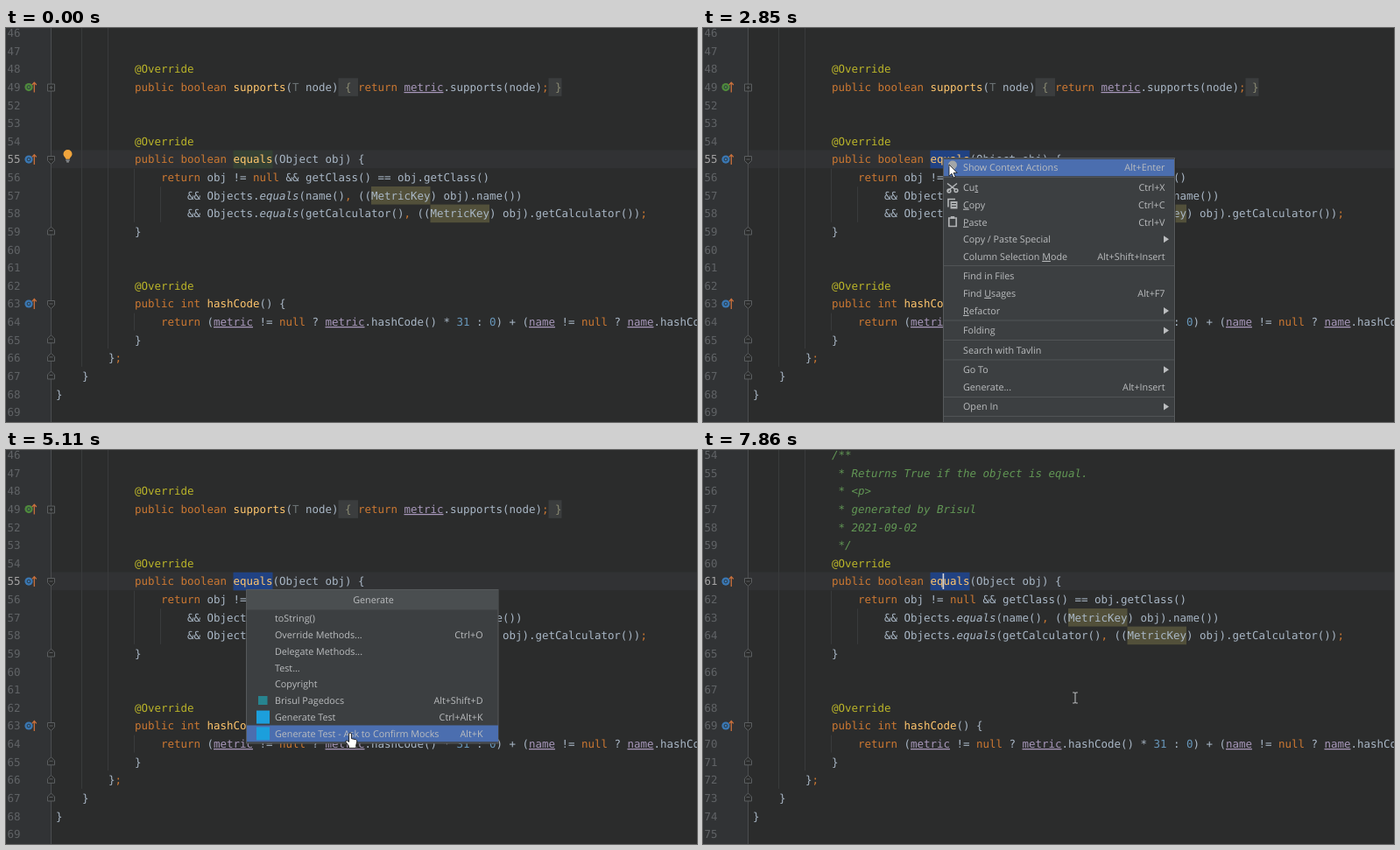
Write an HTML page that moves like this. It is 789 by 450 pixels and loops after 8000 ms.

```html
<!DOCTYPE html>
<html lang="en">
<head>
<meta charset="utf-8">
<title>Editor: generate a comment</title>
<style>
html, body { margin: 0; width: 100%; height: 100%; overflow: hidden; background: #2b2c2c; }
svg { display: block; width: 789px; height: 450px; }
text { white-space: pre; text-rendering: geometricPrecision; font-variant-ligatures: none; }
.code { font: 12.46px "DejaVu Sans Mono", monospace; fill: #a9b7c6; }
.ui { font: 10.75px "Open Sans", "Noto Sans", sans-serif; fill: #bbbdbf; }
.num { fill: #606366; }
.num.on { fill: #a4a3a3; }
.note { fill: #bbb529; }
.key { fill: #cc7832; }
.field { fill: #a898bb; text-decoration: underline; }
.lit { fill: #6897bb; }
.static { font-style: italic; }
.decl { fill: #ffc66d; }
.type { fill: #6c7376; }
.fold { fill: #8a8a72; }
.doc { fill: #629755; font-style: italic; }
.u { text-decoration: underline; }
</style>
</head>
<body>
<svg id="stage" viewBox="0 0 789 450"></svg>
<script>
const LOOP = 8000, CH = 7.5, LEFT = 57;
const rowY = r => 5.7 + 20.62 * r;
const colX = c => LEFT + c * CH;
const esc = s => s.replace(/&/g, '&amp;').replace(/</g, '&lt;');
const rect = (x, y, w, h, fill, more = '') =>
  `<rect x="${x}" y="${y}" width="${w}" height="${h}" fill="${fill}" ${more}/>`;
const line = (x1, y1, x2, y2, color) =>
  `<path d="M${x1} ${y1}L${x2} ${y2}" stroke="${color}"/>`;
const group = (id, body) => `<g id="${id}">${body}</g>`;
const at = (x, y, body) => `<g transform="translate(${x} ${y})">${body}</g>`;

// ---- code ----
const SYNTAX = /(?<note>@\w+)|(?<key>\b(?:public|boolean|int|return|null)\b|[;,])|(?<field>\b(?:metric|name)\b(?!\())|(?<lit>\b\d+\b)|(?<static>(?<=Objects\.)equals)|(?<decl>(?<=(?:boolean|int) )\w+)|(?<type>\bT\b)|(?<fold>\{(?= return)|(?<=; )\})/g;

function paint(src) {
  let out = '', end = 0;
  for (const m of src.matchAll(SYNTAX)) {
    const kind = Object.keys(m.groups).find(k => m.groups[k]);
    out += esc(src.slice(end, m.index)) + `<tspan class="${kind}">${m[0]}</tspan>`;
    end = m.index + m[0].length;
  }
  return out + esc(src.slice(end));
}
const codeLine = ([row, col, src]) =>
  `<text class="code" x="${colX(col)}" y="${rowY(row) + 4.4}">${paint(src)}</text>`;
const docLine = (src, row) =>
  `<text class="code doc" x="${colX(12)}" y="${rowY(row) + 4.4}">${esc(src)}</text>`;

const shared = [
  [6, 12, '@Override'],
  [7, 12, 'public boolean equals(Object obj) {'],
  [8, 16, 'return obj != null && getClass() == obj.getClass()'],
  [9, 20, '&& Objects.equals(name(), ((MetricKey) obj).name())'],
  [10, 20, '&& Objects.equals(getCalculator(), ((MetricKey) obj).getCalculator());'],
  [11, 12, '}'],
  [14, 12, '@Override'],
  [15, 12, 'public int hashCode() {'],
  [16, 16, 'return (metric != null ? metric.hashCode() * 31 : 0) + (name != null ? name.hashCode() : 0);'],
  [17, 12, '}'],
  [18, 8, '};'],
  [19, 4, '}'],
  [20, 0, '}']
];
const before = [
  [2, 12, '@Override'],
  [3, 12, 'public boolean supports(T node) { return metric.supports(node); }']
];
const docs = ['/**', ' * Returns True if the object is equal.', ' * <p>',
  ' * generated by Brisul', ' * 2021-09-02', ' */'];

const numbers = label => Array.from({ length: 22 }, (_, r) =>
  `<text class="code num${r === 7 ? ' on' : ''}" x="1.5" y="${rowY(r) + 4.4}">${label(r)}</text>`).join('');

const override = (row, color) => at(26, rowY(row),
  `<circle r="4.6" fill="${color}"/><circle r="1.9" fill="none" stroke="#2b3a45"/>
   <path d="M6.3 6V-5M3.8-2.6L6.3-5.4L8.8-2.6" fill="none" stroke="#c9703c" stroke-width="1.3"/>`);
const marker = (row, dir) => at(51.5, rowY(row) + dir * .5,
  `<path d="M-4 ${-4 * dir}h8v${5 * dir}l-4 ${4 * dir}l-4 ${-4 * dir}zM-2-.5h4" fill="#2b2c2c" stroke="#5c5f61"/>`);
const plusBox = at(51.5, rowY(3) + .5,
  '<path d="M-4-4h8v8h-8zM-2 0h4M0-2v4" fill="#2b2c2c" stroke="#5c5f61"/>');
const box = (row, col, len, fill) => rect(colX(col), rowY(row) - 10.3, len * CH, 20.6, fill);
const guide = (col, from, to) =>
  line(colX(col) - .5, rowY(from) - 10, colX(col) - .5, rowY(to) + 10, '#393b3c');

const bulb = color => `<path d="M-2.2 3.2C-2.2 1.5-5 .5-5-2.4A5 5 0 0 1 5-2.4C5 .5 2.2 1.5 2.2 3.2z" fill="${color}"/>
  <path d="M-2.2 4.6h4.4M-1.4 6.4h2.8" stroke="#9a9da0" stroke-width="1.2"/>`;

const editor =
  rect(0, 0, 789, 450, '#2b2c2c') + rect(0, 0, 51, 450, '#313335') +
  rect(52, 139.5, 737, 20.6, '#313234') + line(51.5, 0, 51.5, 450, '#4b4d4f') +
  guide(4, -1, 18) + guide(8, -1, 17) + guide(12, 8, 10) + guide(16, 9, 10) + guide(12, 16, 16) +
  box(9, 48, 9, '#52503a') + box(10, 57, 9, '#52503a') +
  group('ident', box(7, 27, 6, '#344134')) + group('sel', box(7, 27, 6, '#214283')) +
  shared.map(codeLine).join('') +
  group('old', box(3, 43, 3, '#3b3d3e') + box(3, 75, 2, '#3b3d3e') +
    before.map(codeLine).join('') + numbers(r => (r < 4 ? 46 : 48) + r) +
    override(3, '#4f8a3c') + plusBox) +
  group('new', docs.map(docLine).join('') + numbers(r => 54 + r)) +
  override(7, '#3a78b4') + override(15, '#3a78b4') +
  marker(7, 1) + marker(15, 1) + [11, 17, 18, 19].map(r => marker(r, -1)).join('') +
  group('bulb', at(70.5, 146.5, bulb('#f0a43c'))) +
  group('caret', rect(273.6, 141, 1.6, 18, '#d6d6d6'));

// ---- menus ----
const label = (x, y, s, more = '') =>
  `<text class="ui" x="${x}" y="${y + 3.9}" ${more}>${s.replace(/_(.)/, '<tspan class="u">$1</tspan>')}</text>`;
const END = 'text-anchor="end"';

const menuRows = [
  [159.5, 'Show Context Actions', 'Alt+Enter'],
  [182, 'Cu_t', 'Ctrl+X'],
  [201.8, '_Copy', 'Ctrl+C'],
  [221.8, '_Paste', 'Ctrl+V'],
  [241.3, 'Copy / Paste Special', '>'],
  [261, 'Column Selection _Mode', 'Alt+Shift+Insert'],
  [283, 'Find in Files', ''],
  [303, 'Find _Usages', 'Alt+F7'],
  [323, '_Refactor', '>'],
  [345.5, 'Folding', '>'],
  [368, 'Search with Tavlin', ''],
  [390.3, 'Go To', '>'],
  [410.2, 'Generate...', 'Alt+Insert'],
  [432.5, 'Open In', '>']
];
const hint = (y, s) => s === '>'
  ? `<path d="M526 ${y - 4}l6 4l-6 4z" fill="#bbbdbf"/>` : label(527.5, y, s, END);
const icons =
  at(285, 159, bulb('#a3a6a8')) +
  at(285, 182, `<g fill="none" stroke="#b4b7b9" stroke-width="1.5"><path d="M-6-4.5L3 2.4M-6 4.5L5-4.5"/>
    <circle cx="4" cy="3.6" r="1.9"/><circle cx="-4" cy="4" r="1.9"/></g>`) +
  at(285, 201, `<path d="M-5 3.5V-5.5H3" fill="none" stroke="#b4b7b9" stroke-width="1.6"/>
    <path d="M-3-3.5H6V6H-3zM-1-.5h5M-1 2.5h5" fill="#afb1b3" stroke="#3c3f41"/>`) +
  at(285, 221, `<path d="M-4.2-4H4.2V5.5H-4.2z" fill="none" stroke="#afb1b3" stroke-width="1.7"/>
    <path d="M-2.2-6h4.4v3h-4.4z" fill="#afb1b3"/>`);

const menu = rect(275, 149, 265, 305, '#202121', 'opacity=".5"') +
  rect(274.5, 148.5, 264, 305, '#3c3f41', 'stroke="#56595b"') +
  rect(275, 0, 263, 19.4, '#4b6eaf', 'id="menuHit"') +
  [170.5, 271.5, 334, 356.5, 379, 421.5, 443.5].map(y => line(275, y, 538, y, '#515456')).join('') +
  icons + menuRows.map(([y, s, k]) => label(297, y, s) + hint(y, k)).join('');

const popRows = [
  ['toString()', ''], ['Override Methods...', 'Ctrl+O'], ['Delegate Methods...', ''],
  ['Test...', ''], ['Copyright', ''], ['Brisul Pagedocs', 'Alt+Shift+D'],
  ['Generate Test', 'Ctrl+Alt+K'], ['Generate Test - Ask to Confirm Mocks', 'Alt+K']
];
const POP_TOP = 183, POP_STEP = 18.78;
const popY = i => POP_TOP + POP_STEP * (i + .5);
const popup = rect(274.5, 159.5, 287.5, 175.5, '#3c3f41', 'stroke="#56595b"') +
  rect(275, 160, 287, 22.5, '#4a4e50') + label(419.5, 171, 'Generate', 'text-anchor="middle"') +
  rect(275, 0, 287, POP_STEP, '#4b6eaf', 'id="popHit"') +
  popRows.map(([s, k], i) => label(307, popY(i), s) + label(544.5, popY(i), k, END)).join('') +
  rect(288, 281, 10.5, 10, '#27848f') +
  [6, 7].map(i => rect(286, popY(i) - 7.5, 15, 15, '#1c9fdc')).join('');

// ---- pointer ----
const pointer =
  group('spot', '<circle r="11.4" fill="#d9d312" fill-opacity=".7"/>') +
  group('beam', '<path d="M-2.8-6H-1Q0-6 0-5Q0-6 1-6H2.8M0-5V5M-2.8 6H-1Q0 6 0 5Q0 6 1 6H2.8" fill="none" stroke="#c4c6c8"/>') +
  group('arrow', '<path d="M0 0V13.2L3-10.4" fill="none"/><path d="M0 0V13L3 10.2L5.1 15L7.2 14.1L5.1 9.4H9.2z" fill="#fff" stroke="#111" stroke-width=".8"/>') +
  group('hand', `<path d="M-1.4.8Q0-1 1.4.8V6.6L6.6 7.8Q8 8.4 7.8 10L6.8 14V17.5H-1.6V15L-5 10.4Q-5.4 8.6-3.6 8.8L-1.4 10.4z"
    fill="#fff" stroke="#111" stroke-width=".9"/>`);

const stage = document.getElementById('stage');
stage.innerHTML = editor + group('menu', menu) + group('popup', popup) + group('pointer', pointer);
const el = {};
stage.querySelectorAll('[id]').forEach(e => el[e.id] = e);

// ---- motion ----
// start, end, step count, then [step, x, y] points
const moves = [
  [140, 220, 2, [0, 469, 376], [1, 385, 309]],
  [520, 1150, 9, [0, 380, 301], [2, 350, 252], [5, 296, 174], [8, 275, 149]],
  [2850, 3640, 11, [0, 281, 156], [3, 330, 268], [7, 391, 394], [10, 393, 404]],
  [4950, 5730, 11, [0, 393, 390], [2, 393, 323], [6, 410, 296], [10, 424, 270]],
  [6000, 6220, 4, [0, 424, 273], [3, 425, 283]]
];
const clicks = [[1530, 1700], [1930, 2000], [2170, 2250], [4110, 4340], [6450, 6700]];

function place(t) {
  const [t0, t1, n, ...pts] = moves.filter(m => t >= m[0]).pop() || moves[0];
  const k = Math.max(0, Math.min(n - 1, Math.floor((t - t0) * (n - 1) / (t1 - t0) + .01)));
  const i = Math.max(1, pts.findIndex(p => p[0] >= k));
  const [a, b] = [pts[i - 1], pts[i]];
  const f = (k - a[0]) / (b[0] - a[0]);
  return [a[1] + (b[1] - a[1]) * f, a[2] + (b[2] - a[2]) * f];
}
const within = (t, a, b) => t >= a && t < b;
const show = (id, on) => { el[id].style.display = on ? '' : 'none'; };

function draw(t) {
  const [x, y] = place(t);
  const done = t >= 7860;
  const popOpen = within(t, 4490, 6770);
  const inPop = popOpen && y < 335;
  const arrow = within(t, 2250, 4490);

  show('old', !done);
  show('new', done);
  show('bulb', t < 1700);
  show('ident', t < 1700);
  show('sel', t >= 1930);
  show('caret', within(t, 6850, 7400) || done);
  show('menu', within(t, 2250, 4340));
  show('popup', popOpen);

  show('menuHit', t >= 2850);
  const near = menuRows.reduce((p, q) => Math.abs(q[0] - y) < Math.abs(p[0] - y) ? q : p);
  el.menuHit.setAttribute('y', near[0] - 9.7);
  const row = inPop ? Math.max(0, Math.min(7, Math.floor((y - POP_TOP) / POP_STEP))) : 0;
  el.popHit.setAttribute('y', POP_TOP + row * POP_STEP);

  show('pointer', t >= 140);
  el.pointer.setAttribute('transform', `translate(${x} ${y})`);
  show('spot', clicks.some(c => within(t, ...c)));
  show('arrow', arrow);
  show('hand', inPop);
  show('beam', !arrow && !inPop);
}

const start = performance.now();
function tick() {
  draw((performance.now() - start) % LOOP);
  requestAnimationFrame(tick);
}
tick();
</script>
</body>
</html>
```
